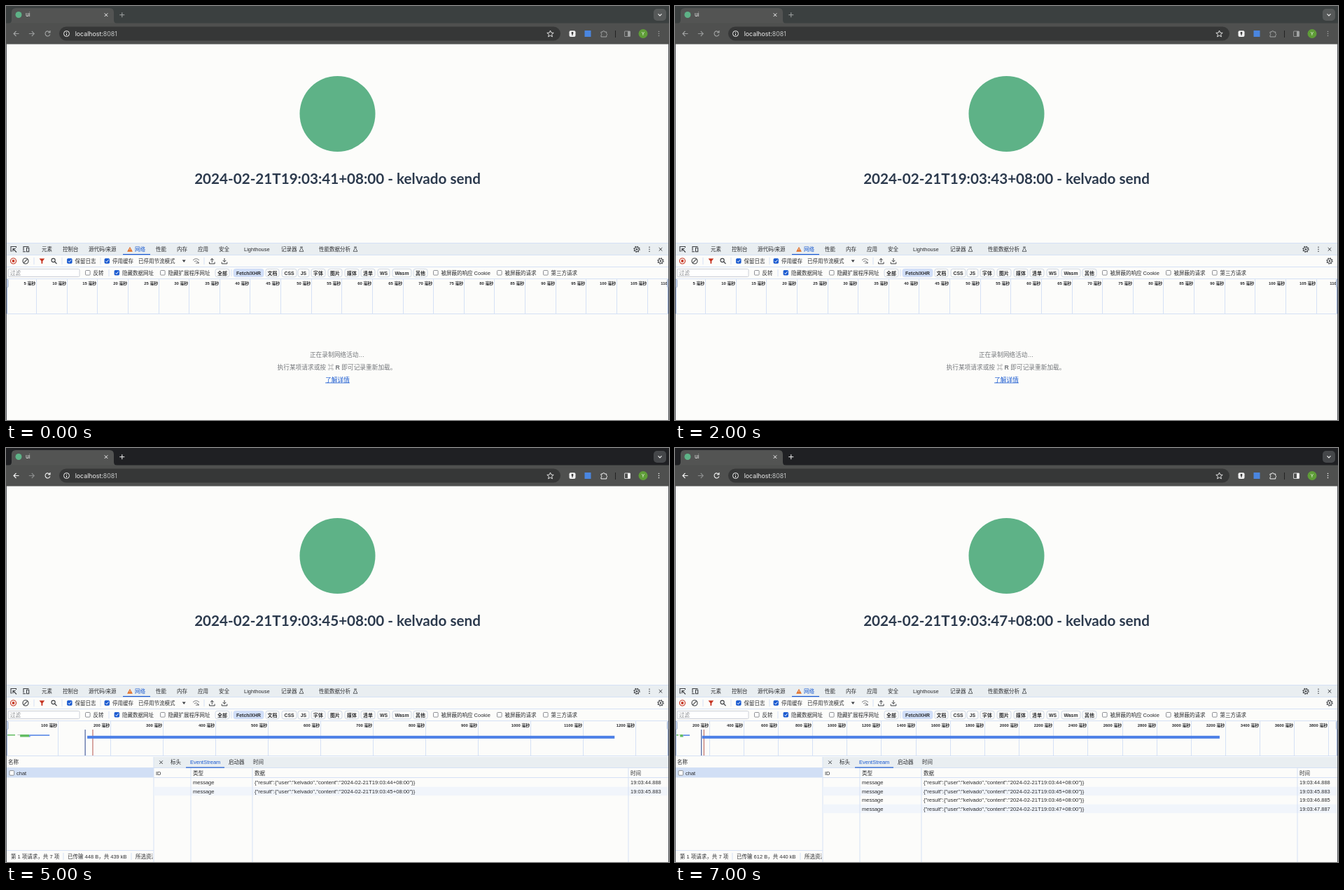
Animation of 947x591 px, one loop 8000 ms. Source, as an HTML page:

```html
<!DOCTYPE html>
<html lang="zh-CN">
<head>
<meta charset="utf-8">
<title>ui</title>
<style>
html, body { margin: 0; width: 100%; height: 100%; overflow: hidden; background: #fcfcfa; }
svg { display: block; }
text { font: 7.5px 'Liberation Sans', 'Noto Sans CJK SC', sans-serif; fill: #2b2c2f; white-space: pre; }
</style>
</head>
<body>
<svg id="stage" width="947" height="591" viewBox="0 0 947 591"></svg>
<script>
const USER = 'kelvado';
const BLUE = '#1a5ad0', RED = '#c5321f', RULE = '#d5e1f5', INK = '#3c3f43', BAR = '#e9eef1', PAPER = '#fcfcfa';
const stage = document.getElementById('stage');

// Markup helpers
const text = (x, y, s, style = '', anchor = 'start') =>
  `<text x="${x}" y="${y}" style="${style}" text-anchor="${anchor}">${s}</text>`;
const rect = (x, y, w, h, fill, rx = 0, stroke = 'none') =>
  `<rect x="${x}" y="${y}" width="${w}" height="${h}" fill="${fill}" rx="${rx}" stroke="${stroke}" stroke-width=".8"/>`;
const path = (d, stroke = INK, width = 1, fill = 'none') =>
  `<path d="${d}" stroke="${stroke}" stroke-width="${width}" fill="${fill}"/>`;
const disc = (x, y, r, fill, stroke = 'none', width = 1) =>
  `<circle cx="${x}" cy="${y}" r="${r}" fill="${fill}" stroke="${stroke}" stroke-width="${width}"/>`;
const vline = (x, y1, y2, color = RULE, width = 1) => path(`M${x} ${y1}V${y2}`, color, width);
const hline = (y, x1 = 0, x2 = 947, color = RULE) => path(`M${x1} ${y}H${x2}`, color);
const cross = (x, y, color = INK, r = 2.3) =>
  path(`M${x - r} ${y - r}l${2 * r} ${2 * r}m0 ${-2 * r}l${-2 * r} ${2 * r}`, color);
const dots = (x, y, color) => [-3, 0, 3].map(d => disc(x, y + d, .8, color)).join('');
const gear = (x, y) => disc(x, y, 3.2, 'none', INK) + disc(x, y, 1.2, INK) +
  `<circle cx="${x}" cy="${y}" r="4.1" fill="none" stroke="${INK}" stroke-width="1.2" stroke-dasharray="1.6 1.62"/>`;
const flask = x => path(`M${x - 1.8} 344h3.6m-2.7 0v2.3l-2 4h5.8l-2-4V344`, INK, .8);
const check = (x, y, on, label) =>
  rect(x, y, 6.6, 6.6, on ? BLUE : '#fff', 1, on ? BLUE : '#74777b') +
  (on ? path(`M${x + 1.4} ${y + 3.4}l1.5 1.6l2.6-3.4`, '#fff') : '') + text(x + 11, y + 6.1, label);

function chrome(focused) {
  const bright = focused ? '#f3f3f3' : '#a2a4a4', dim = focused ? '#8b8d8d' : '#969898';
  const toolbar = '#4f504f', white = '#f0f0f0';
  return rect(0, 0, 947, 25, focused ? '#1f2023' : '#3b4040') +
    path('M3 25Q8 25 8 20V9Q8 3 14 3H148Q154 3 154 9V20Q154 25 159 25Z', 'none', 0, '#535453') +
    rect(0, 24.5, 947, 30, toolbar) +
    disc(18, 12.5, 4.5, '#5eb287') +
    text(28, 15.3, 'ui', 'font:8px Inter,sans-serif;fill:#eee') + cross(143, 12.7, white) +
    path('M162.3 12.7h7m-3.5-3.5v7', bright) +
    rect(925, 4, 18, 17, focused ? '#45474a' : '#565959', 5) + path('M931.5 11.3l2.5 2.5l2.5-2.5', white, 1.2) +
    path('M18.5 39.5h-7.5m3.5-3.5l-3.5 3.5l3.5 3.5', bright, 1.1) +
    path('M32.8 39.5h7.5m-3.5-3.5l3.5 3.5l-3.5 3.5', dim, 1.1) +
    path('M62.5 37.5a3.5 3.5 0 1 0 .4 3M63 35v3h-3', bright, 1.1) +
    rect(76, 29.5, 716, 20, '#363737', 10) +
    disc(86.5, 39.5, 4, 'none', white) + path('M86.5 37v1.1m0 1.1v2.8', white) +
    text(98.7, 42.6, 'localhost:<tspan fill="#c4c6c6">8081</tspan>', 'font:8.8px Inter,sans-serif;fill:#f2f2f2') +
    path('M777.5 35l1.3 3.1l3.4.3l-2.6 2.2l.8 3.3l-2.9-1.8l-2.9 1.8l.8-3.3l-2.6-2.2l3.4-.3Z', white, .9) +
    rect(804.5, 35.3, 9, 8.6, white, 2) + disc(809, 38.5, 1.4, '#333') + vline(809, 38, 42, '#333', 1.2) +
    rect(826.5, 35, 9, 9, '#4a86e0') +
    path('M850 37h2.3a1.4 1.4 0 0 1 2.8 0h2.6v2.4a1.4 1.4 0 0 1 0 2.6v2h-7.7v-2.3a1.4 1.4 0 0 0 0-2.6Z', bright) +
    vline(870.5, 35, 45, '#222') +
    rect(883.5, 36, 8, 7.5, 'none', .5, bright) + rect(888, 36, 3.5, 7.5, bright) +
    disc(910, 39.5, 6.5, '#5f9d38') + text(910, 42, 'Y', 'font-size:6.5px;fill:#fff', 'middle') +
    dots(932.5, 39.5, bright);
}

function page(second) {
  return disc(473.5, 154, 54, '#5eb287') +
    text(473.5, 254, `2024-02-21T19:03:${second}+08:00 - ${USER} send`,
      'font:700 20.65px Lato,sans-serif;fill:#2c3a4d', 'middle');
}

function toolbars() {
  const tabs = [[51, '元素'], [81, '控制台'], [118, '源代码/来源'], [214, '性能'], [244, '内存'], [274, '应用'],
    [304, '安全'], [340, 'Lighthouse'], [393, '记录器'], [447, '性能数据分析']];
  const chips = [[299, 20, '全部'], [325, 43, 'Fetch/XHR'], [371, 19, '文档'], [394, 21, 'CSS'], [417, 16, 'JS'],
    [436, 20, '字体'], [460, 20, '图片'], [484, 20, '媒体'], [507, 20, '清单'], [531, 17, 'WS'],
    [552, 27, 'Wasm'], [582, 20, '其他']];
  return rect(0, 338, 947, 18, BAR) + hline(338.5) + hline(355.5) +
    path('M8.5 350H7v-6.5h7.5V345M10 346.5l5 5m-5-1.3v-3.7h3.7', INK, 1.1) +
    path('M25 349.5v-6h7.5M24 350.8h4M29.5 345.2h3.2v5.6h-3.2Z', INK, 1.1) +
    tabs.map(([x, s]) => text(x, 350, s)).join('') +
    path('M177 343.8l3.9 7h-7.8Z', 'none', 0, '#e0702a') + vline(177, 346.3, 348.6, '#fff', .8) +
    text(184, 350, '网络', 'fill:' + BLUE) + rect(167, 354, 39, 1.2, BLUE) +
    flask(422) + flask(499) + gear(901, 347.3) + dots(919, 347.3, INK) + cross(935, 347.3) +
    // Recording controls
    disc(10.5, 364, 4, 'none', RED, 1.1) + rect(8.8, 362.3, 3.4, 3.4, RED) +
    disc(28, 364, 4, 'none', INK, 1.1) + path('M25.2 366.8l5.6-5.6', INK, 1.1) +
    path('M47.6 360.5h7.6l-2.9 3.8v3.5h-1.8v-3.5Z', 'none', 0, RED) +
    disc(67.6, 363, 2.6, 'none', INK, 1.1) + path('M69.5 365l3 3', INK, 1.1) +
    check(87.5, 360.7, 1, '保留日志') + check(141, 360.7, 1, '停用缓存') + text(189, 366.9, '已停用节流模式') +
    path('M251.7 362.5h5l-2.5 3.4Z', 'none', 0, INK) +
    path('M267 363q4.5-4.5 9 0m-7 2q2.5-2.5 5 0m-3 2h2', '#74777b') + disc(274.5, 366.5, 1.3, '#74777b') +
    path('M294.3 366v-5.5m-2.4 2.4l2.4-2.4l2.4 2.4M290.5 365.5v2.4h7.6v-2.4', INK) +
    path('M312 360v5.3m-2.4-2.4l2.4 2.4l2.4-2.4M308.2 365.5v2.4h7.6v-2.4', INK) + gear(935, 364) +
    [40, 80, 135, 283].map(x => vline(x, 359, 369)).join('') + hline(372.5) +
    // Filters
    rect(3, 375.5, 102, 11, '#fff', 1.5, '#bfc5ce') + text(6, 383.8, '过滤', 'fill:#85888c') +
    check(113.5, 377.5, 0, '反转') + check(155, 377.5, 1, '隐藏数据网址') + check(220.5, 377.5, 0, '隐藏扩展程序网址') +
    chips.map(([x, w, s], i) => rect(x, 375.3, w, 11.5, i == 1 ? '#d0def8' : PAPER, 3, i == 1 ? '#d0def8' : '#c3cee0') +
      text(x + w / 2, 383.6, s, 'font-weight:700;font-size:6.9px', 'middle')).join('') +
    check(610.5, 377.5, 0, '被屏蔽的响应 Cookie') + check(701.5, 377.5, 0, '被屏蔽的请求') + check(767.5, 377.5, 0, '第三方请求') +
    [147, 322].map(x => vline(x, 376, 386)).join('') + hline(389.5);
}

// Network timeline: span is the visible time in ms, streamEnd the end of the open request
function overview(span, step, streamEnd) {
  const scale = 947 / span, at = ms => 1 + ms * scale;
  const bar = (from, to, y, h, color) => rect(at(from), y, (to - from) * scale, h, color);
  let out = '';
  for (let ms = step; ms < span + step / 2; ms += step) {
    const x = Math.floor(ms * scale) + .5;
    out += vline(x, 390, 440) + text(x - 1.3, 398.3, ms + ' 毫秒', 'font-size:5.9px;font-weight:700', 'end');
  }
  if (span > 150) {
    out += streamEnd ? bar(.5, 16, 409, 1.5, '#63bd63') : bar(0, 19.3, 405, 4, '#4c7fe6');
    out += bar(20.5, 25.5, 409, 1, '#b9bcc0') + bar(25.5, 43, 409, 3.5, '#63bd63') + bar(43, 81.6, 409.3, 1.5, '#4c7fe6') +
      bar(43, 44.8, 411, 1.5, '#4c7fe6');
    if (!streamEnd) out += bar(154, 157, 413, 1, '#63bd63') + bar(155.5, 162.7, 413, 1.5, '#4c7fe6') +
      bar(165.5, 168.8, 409, 1.5, '#63bd63');
    out += vline(at(149.5), 402, 440, '#26408b') + vline(at(164), 402, 440, '#b4554c');
    if (streamEnd) out += bar(153.5, streamEnd, 410.8, 4, '#4c7fe6');
  }
  return out + rect(.5, 390.5, 2.5, 11, '#c9d8f3', 1, '#8fa3c4') + rect(944.5, 390.5, 2.5, 11, '#c9d8f3', 1, '#8fa3c4') +
    vline(1.5, 402, 440, '#9db5e0') + vline(945.5, 402, 440, '#9db5e0') + hline(439.5);
}

function emptyPanel() {
  const grey = 'font-size:8.7px;fill:#74777b';
  return text(473, 501.2, '正在录制网络活动…', grey, 'middle') +
    text(472.5, 519, '执行某项请求或按 <tspan font-weight="700">⌘ R</tspan> 即可记录重新加载。', grey, 'middle') +
    text(473.5, 536.5, '了解详情', `font-size:8.7px;fill:${BLUE};text-decoration:underline`, 'middle');
}

function requestTable() {
  const heads = [[3, '名称'], [298, '状态'], [386, '类型'], [486, '启动器'], [633, 'Cookie'], [721, '大小'], [809, '时间'], [886, '瀑布']];
  const status = [[7, '第 1 项请求，共 7 项'], [88, '已传输 366 B，共 439 kB'], [185, '所选资源大小为 76 B，共 1.8 MB'],
    [308, '完成用时：168 毫秒'], [387, 'DOMContentLoaded：148 毫秒', '#1a4aa8'], [506, '加载时间：163 毫秒', RED]];
  return rect(0, 457, 947, 13.5, '#f3f6fb') + hline(456.5) +
    [295, 383, 482, 630, 718, 806, 883].map(x => vline(x + .5, 441, 574)).join('') +
    heads.map(([x, s]) => text(x, 451.3, s)).join('') + path('M934.7 450.5h4.6l-2.3-3.8Z', 'none', 0, INK) +
    check(5, 460.6, 0, '') + text(15, 466.6, 'chat') + text(298, 466.6, '200') + text(386, 466.6, 'eventsource') +
    text(486, 466.6, '（索引）:17', 'text-decoration:underline') + text(715, 466.6, '0', '', 'end') +
    text(804, 466.6, '366 B', '', 'end') + text(881, 466.6, '8 毫秒', '', 'end') +
    vline(939.5, 457, 574, '#7f9ad6') + vline(944.5, 457, 574, '#c9756c') + rect(944, 460, 3, 7.5, '#4c7fe6') +
    hline(574.5) + status.map(([x, s, color = '#2b2c2f'], i) =>
      text(x, 585.6, s, 'fill:' + color) + (i ? vline(x - 6, 578, 588) : '')).join('');
}

function eventPanel(last, bytes, total) {
  const millis = [888, 883, 885, 887];
  let out = rect(0, 457, 211, 13.5, '#d1dff5') + hline(456.5) + text(3, 451.3, '名称') +
    check(5, 460.6, 0, '') + text(15, 466.6, 'chat') + hline(574.5, 0, 211) +
    text(7, 585.6, '第 1 项请求，共 7 项') + text(88, 585.6, `已传输 ${bytes} B，共 ${total} kB`) +
    text(185, 585.6, '所选资源') + vline(82, 578, 588) + vline(179, 578, 588) +
    rect(209.5, 575, 738, 16, PAPER) + rect(211, 441, 736, 16, BAR) + vline(211, 441, 591) +
    cross(221.5, 448.7) + text(235, 451.3, '标头') + text(263, 451.3, 'EventStream', 'fill:' + BLUE) +
    text(318, 451.3, '启动器') + text(353, 451.3, '时间') + hline(456.5, 211) + rect(257, 455.5, 55, 1.2, BLUE) +
    text(214, 466.8, 'ID') + text(267, 466.8, '类型') + text(355, 466.8, '数据') + text(892, 466.8, '时间') + hline(470.5, 211);
  for (let s = 44; s <= last; s++) {
    const i = s - 44, y = 480 + i * 12.5;
    if (i % 2) out += rect(211.5, y - 8.8, 736, 12.5, '#f1f5fb');
    out += text(267, y, 'message') +
      text(355, y, `{"result":{"user":"${USER}","content":"2024-02-21T19:03:${s}+08:00"}}`, 'font-size:7.7px') +
      text(892, y, `19:03:${s}.${millis[i]}`);
  }
  return out + [264, 352, 889].map(x => vline(x, 457, 591)).join('');
}

// One entry per second: clock, timeline, lower panel
const idle = [108.55, 5, 0];
const scenes = [
  ...[41, 42, 43, 44].map(s => [s, idle, emptyPanel]),
  [44, [170.2, 10, 0], requestTable],
  [45, [1263, 100, 1158], () => eventPanel(45, 448, 439)],
  [46, [2600, 200, 2160], () => eventPanel(46, 530, 439)],
  [47, [3853, 200, 3161], () => eventPanel(47, 612, 440)],
];

let shown = -1;
function frame() {
  const index = Math.floor(performance.now() % 8000 / 1000);
  if (index !== shown) {
    shown = index;
    const [second, timeline, panel] = scenes[index];
    stage.innerHTML = rect(0, 0, 947, 591, PAPER) + page(second) + toolbars() + overview(...timeline) + panel() +
      vline(.5, 54, 591, '#55585c') + vline(946.5, 54, 591, '#55585c') + chrome(index > 3);
  }
  requestAnimationFrame(frame);
}
frame();
</script>
</body>
</html>
```
